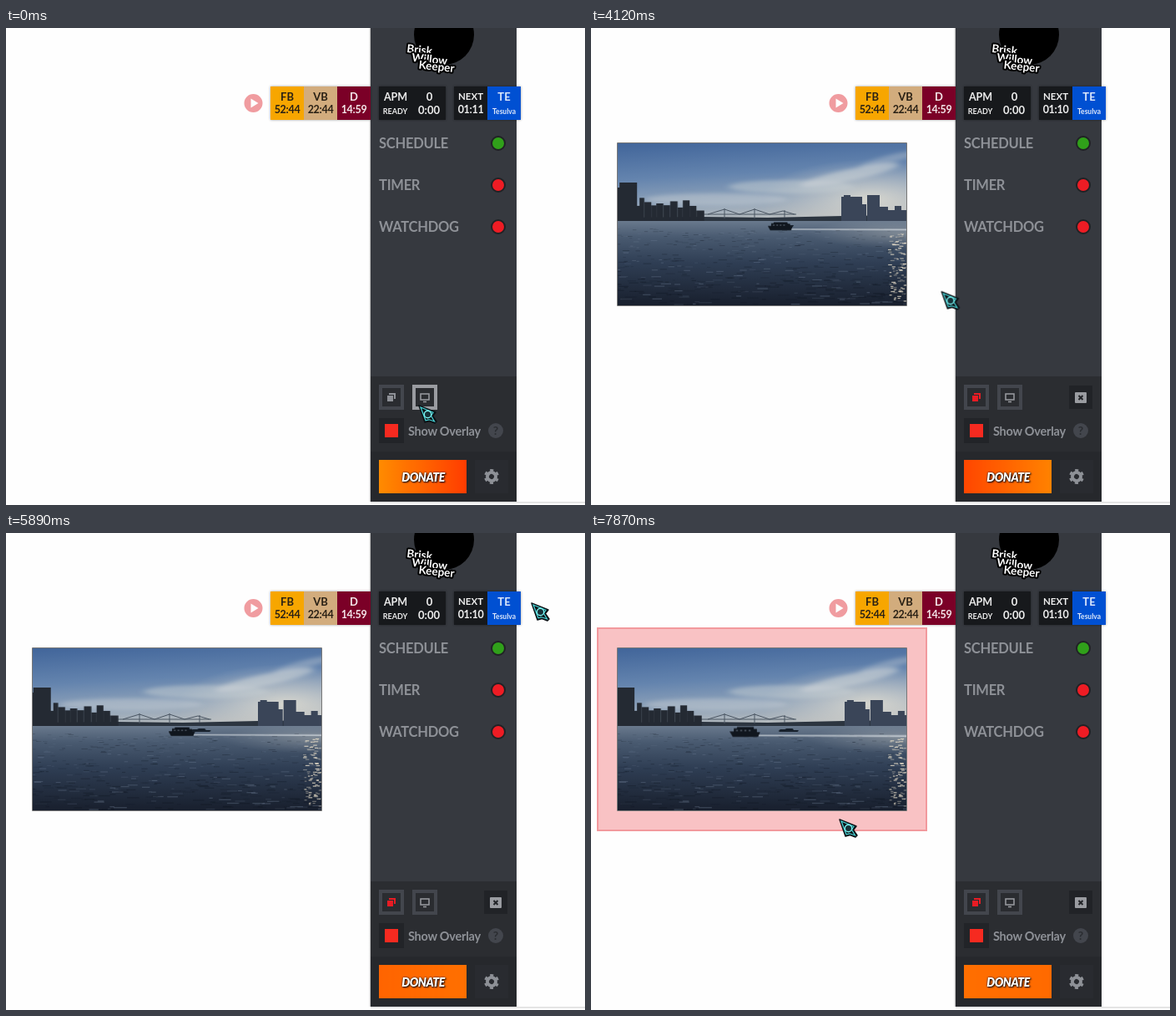
These frames come from a looping animation (694x571 px, 8 s). An HTML page:

```html
<!DOCTYPE html>
<html lang="en">
<head>
<meta charset="utf-8">
<title>Overlay demo</title>
<style>
html, body { margin: 0; width: 100%; height: 100%; overflow: hidden; background: #fefefe; }
svg { display: block; }
text { font-family: Lato, "Open Sans", sans-serif; font-weight: 700; }
.mid { text-anchor: middle; }
.nav { font-size: 16.5px; letter-spacing: -.25px; fill: #8e9197; }
.time { font-size: 12.5px; letter-spacing: -.3px; }
.word { font-size: 13.5px; fill: #fff; stroke: #000; stroke-width: 4px; stroke-linejoin: round; paint-order: stroke; }
.donate { font-size: 14px; font-weight: 900; font-style: italic; letter-spacing: -.5px; fill: #fff; text-shadow: 1px 1px 2px #000, 0 0 2px #000; }
#tiles { filter: drop-shadow(0 0 1.5px rgba(0, 0, 0, .4)); }

.anim, .step { animation-duration: 8s; animation-iteration-count: infinite; }
.anim { animation-timing-function: linear; }
.step { animation-timing-function: step-end; }

#cursor { animation-name: cursor; }
@keyframes cursor {
  0%, 1.9% { transform: translate(495px, 452px); }
  6.25% { transform: translate(636px, 330px); }
  10% { transform: translate(620px, 420px); }
  13.5% { transform: translate(500px, 440px); }
  15% { transform: translate(480px, 446px); }
  19%, 23% { transform: translate(456px, 442px); }
  27.4%, 31.2% { transform: translate(545px, 573px); }
  37%, 39.5% { transform: translate(488px, 501px); }
  43.2% { transform: translate(480px, 436px); }
  50% { transform: translate(465px, 338px); }
  56.4%, 58.5% { transform: translate(276px, 244px); }
  62% { transform: translate(390px, 260px); }
  66% { transform: translate(560px, 140px); }
  69% { transform: translate(660px, 100px); }
  71.7%, 75.5% { transform: translate(630px, 84px); }
  82%, 87.5% { transform: translate(682px, 94px); }
  96.8%, 100% { transform: translate(298px, 343px); }
}
#screenHover { animation-name: screenHover; }
@keyframes screenHover { 0% { opacity: 1 } 2.4% { opacity: 0 } 13% { opacity: 1 } 14.9% { opacity: 0 } }
#layerHover { animation-name: layerHover; }
@keyframes layerHover { 0% { opacity: 0 } 16% { opacity: 1 } 24% { opacity: 0 } }
#before { animation-name: before; }
@keyframes before { 0% { opacity: 1 } 7.5% { opacity: 0 } }
#after { animation-name: after; }
@keyframes after { 0% { opacity: 0 } 7.5% { opacity: 1 } }
#video { animation-name: video; }
@keyframes video { 0% { opacity: 0 } 32.9% { opacity: 1 } }
.captured { animation-name: captured; }
@keyframes captured { 0% { opacity: 0 } 42% { opacity: 1 } }
#player { animation-name: player; }
@keyframes player { 0%, 41% { opacity: 1 } 44%, 100% { opacity: 0 } }
#barHover { animation-name: barHover; }
@keyframes barHover { 0% { opacity: 0 } 75.8% { opacity: 1 } 89% { opacity: 0 } }
#videoHover { animation-name: videoHover; }
@keyframes videoHover { 0% { opacity: 0 } 61.2% { opacity: 1 } 64% { opacity: 0 } 95.4% { opacity: 1 } }
#boat { animation-name: boat; }
@keyframes boat {
  0%, 32% { transform: translate(232px, 238px); }
  38% { transform: translate(231px, 238px); }
  57.9% { transform: translate(224px, 238px) scale(1.05); }
  73.6% { transform: translate(210px, 238.5px) scale(1.1); }
  86.4% { transform: translate(197px, 238.5px) scale(1.18); }
  100% { transform: translate(182px, 239px) scale(1.27); }
}
#ferry { animation-name: ferry; }
@keyframes ferry { 0%, 55% { transform: translateX(-6px) } 100% { transform: none } }
#leftBank { animation-name: leftBank; }
@keyframes leftBank { 0%, 38% { transform: translateX(3px) } 100% { transform: translateX(-1px) } }
#rightBank { animation-name: rightBank; }
@keyframes rightBank { 0%, 55% { transform: none } 100% { transform: translateX(4px) } }
.ripple { animation: ripple .52s step-end infinite; }
.ripple.odd { animation-delay: -.26s; }
@keyframes ripple { 0% { opacity: 1 } 50% { opacity: .5 } }
#warm { animation-name: warm; }
@keyframes warm { 0% { opacity: 1 } 14%, 100% { opacity: .05 } }
#cool { animation-name: cool; }
@keyframes cool { 0%, 42% { opacity: 0 } 55%, 60% { opacity: 1 } 71% { opacity: .25 } 80%, 100% { opacity: 0 } }
</style>
</head>
<body>
<svg width="694" height="571" viewBox="0 0 694 571">
<defs>
  <linearGradient id="edge"><stop stop-color="#000" stop-opacity="0"/><stop offset="1" stop-color="#000" stop-opacity=".28"/></linearGradient>
  <linearGradient id="warmFill"><stop stop-color="#ff8c00"/><stop offset="1" stop-color="#ff3c00"/></linearGradient>
  <linearGradient id="coolFill"><stop stop-color="#ff3800"/><stop offset="1" stop-color="#ff8c00"/></linearGradient>
  <linearGradient id="sky" x2=".2" y2="1"><stop stop-color="#41659a"/><stop offset=".45" stop-color="#6484ae"/><stop offset=".8" stop-color="#94a6ba"/><stop offset="1" stop-color="#b3b9bd"/></linearGradient>
  <radialGradient id="glow"><stop stop-color="#dcdad0" stop-opacity=".9"/><stop offset="1" stop-color="#c8cacb" stop-opacity="0"/></radialGradient>
  <linearGradient id="water" x2="0" y2="1"><stop stop-color="#6b7b8f"/><stop offset=".2" stop-color="#495a70"/><stop offset=".5" stop-color="#2f3e54"/><stop offset="1" stop-color="#181f2d"/></linearGradient>
  <linearGradient id="shade" x2="0" y2="1"><stop stop-opacity=".6"/><stop offset=".1" stop-opacity=".2"/><stop offset=".3" stop-opacity="0"/><stop offset=".85" stop-opacity="0"/><stop offset="1" stop-opacity=".55"/></linearGradient>
  <filter id="soft"><feGaussianBlur stdDeviation="4 2"/></filter>
  <clipPath id="frame"><rect x="32" y="138" width="346" height="194"/></clipPath>
</defs>

<!-- side panel -->
<rect x="435" width="2" height="567" fill="url(#edge)"/>
<rect x="437" y="567" width="257" height="2" fill="#e4e4e4"/>
<rect x="437" width="175" height="567" fill="#36393f"/>
<rect x="437" y="417" width="175" height="150" fill="#2b2d31"/>
<rect x="437" y="507" width="175" height="60" fill="#26282c"/>
<circle cx="525" cy="8" r="36"/>
<g transform="rotate(6 480 30)">
  <text class="word" x="480" y="29">Brisk</text>
  <text class="word" x="487" y="39">Willow</text>
  <text class="word" x="496" y="47">Keeper</text>
</g>
<g id="nav"></g>

<!-- lower controls -->
<g fill="#2a2c30" stroke="#43464d" stroke-width="4">
  <rect x="449" y="429" width="26" height="26"/><rect x="489" y="429" width="26" height="26"/>
</g>
<g fill="none" stroke="#9a9ca1" stroke-width="4">
  <rect id="layerHover" class="step" x="449" y="429" width="26" height="26"/>
  <rect id="screenHover" class="step" x="489" y="429" width="26" height="26"/>
</g>
<g fill="#8e9197">
  <path d="M459 437h8v7h-2v-5h-6z"/><path d="M457 440h7v7h-7z"/>
</g>
<g class="step captured">
  <path fill="#e81c24" d="M459 437h8v7h-2v-5h-6zM457 440h7v7h-7z"/>
  <rect x="573" y="428" width="28" height="28" fill="#212327"/>
  <rect x="580" y="436" width="14" height="13" rx="1" fill="#9a9ca1"/>
  <path d="M584.500 440l5 5m0-5l-5 5" stroke="#212327" stroke-width="2"/>
</g>
<path d="M497 438h10v7h-10zM500 447.500h4" fill="none" stroke="#9a9ca1" stroke-width="1.500"/>
<rect x="447" y="467" width="30" height="30" fill="#222428"/>
<rect x="454" y="474" width="16" height="16" fill="#f62a20"/>
<text x="482" y="488" font-size="14.500" letter-spacing="-.25" fill="#8e9197">Show Overlay</text>
<circle cx="587" cy="482" r="9" fill="#43464d"/>
<text class="mid" x="587" y="487" font-size="14" fill="#2b2d31">?</text>
<rect x="447" y="517" width="105" height="40" fill="#ff6d00"/>
<rect id="warm" class="anim" x="447" y="517" width="105" height="40" fill="url(#warmFill)"/>
<rect id="cool" class="anim" x="447" y="517" width="105" height="40" fill="url(#coolFill)"/>
<text class="mid donate" x="500" y="542.500">DONATE</text>
<rect x="562" y="517" width="40" height="40" fill="#292b30"/>
<g transform="translate(582 537) rotate(30)" fill="none" stroke="#8e9197">
  <circle r="5" stroke-width="4"/><circle r="7.700" stroke-width="2.500" stroke-dasharray="4.030 4.030" stroke-dashoffset="2"/>
</g>

<!-- captured video -->
<g id="videoHover" class="step"><rect x="8" y="114" width="394" height="242" fill="#f9c2c4" stroke="#f2999d" stroke-width="2"/></g>
<g id="video" class="step">
  <rect x="31" y="137" width="348" height="196" rx="1" fill="#777"/>
  <g clip-path="url(#frame)">
    <rect x="32" y="138" width="346" height="94" fill="url(#sky)"/>
    <ellipse cx="335" cy="205" rx="130" ry="48" fill="url(#glow)"/>
    <g filter="url(#soft)" fill="#ccd2d6">
      <ellipse cx="310" cy="176" rx="60" ry="7" opacity=".6" transform="rotate(-12 310 176)"/>
      <ellipse cx="240" cy="190" rx="75" ry="8" opacity=".45"/>
      <ellipse cx="150" cy="205" rx="85" ry="7" opacity=".4"/>
      <ellipse cx="355" cy="158" rx="35" ry="5" opacity=".35" transform="rotate(-15 355 158)"/>
    </g>
    <rect x="32" y="230" width="346" height="102" fill="url(#water)"/>
    <ellipse cx="370" cy="246" rx="110" ry="18" fill="url(#glow)" opacity=".35"/>
    <path d="M32 227l100-1 80 1 90-2 76-1v7H32z" fill="#2c3540"/>
    <path d="M128 223h118M140 223l20-6 18 6 18-6 18 6 16-4 14 4M160 216v12M196 216v12M232 218v9" fill="none" stroke="#4b5663"/>
    <g id="leftBank" class="anim" fill="#242a33"></g>
    <g id="rightBank" class="anim" fill="#3a4558">
      <path d="M300 231v-29h3v-2h8v2h14v29zM325 231v-20h5v20zM331 231v-31h15v31zM346 231v-17h10v4h8v-5h8v5h12v13z"/>
    </g>
    <g id="ripples"></g>
    <g id="ferry" class="anim"><path d="M225 237l2-2h6l1-1h8l1 2h6l-1 2h-22z" fill="#17202b"/></g>
    <g id="boat" class="anim">
      <path d="M12 2L190 2.500v2L14 3.500z" fill="#d5dbe0" opacity=".7"/>
      <path d="M-14-1h4v-3h3v-1.500h16v2h3v3h3L13 4H-11z" fill="#10161e"/>
      <path d="M-8-2h16" stroke="#5a6470" stroke-dasharray="2 2"/>
    </g>
    <g id="player" class="anim">
      <rect x="32" y="138" width="346" height="194" fill="url(#shade)"/>
      <path d="M36 324.500h338" stroke="#b5b9bd"/>
      <path d="M38 328.500h42M348 328.500h26M36 142.500h28" stroke="#d0d3d6" stroke-width="1.500" stroke-dasharray="1 5 2 3"/>
    </g>
  </g>
</g>

<!-- overlay bar -->
<g id="barHover" class="step">
  <rect x="252" y="45" width="442" height="90" fill="#ed1c24" opacity=".27"/>
  <rect x="646" y="83" width="14" height="14" rx="1" fill="#73808a"/>
  <path d="M649 94l7-7m-5 0h5v5" fill="none" stroke="#fbd0d2" stroke-width="1.600"/>
  <rect x="678" y="89" width="14" height="9" rx="1"/>
  <path d="M681 90v-3a4 4 0 0 1 8 0v3" fill="none" stroke="#000" stroke-width="2"/>
</g>
<path d="M285.500 90a11 11 0 0 1 22 0a11 11 0 0 1 -22 0zM293.500 84.500v11l9-5.500z" fill="#e0252f" fill-rule="evenodd" opacity=".45"/>
<g id="tiles"></g>
<g class="mid" fill="#eee">
  <text id="before" class="step time" x="557" y="102">01:11</text>
  <text id="after" class="step time" x="557" y="102">01:10</text>
</g>

<g id="cursor" class="anim">
  <path d="M0 0L20 8l-3.500 4.500L21 19l-2 2-6.500-2.500L7 20z" fill="#0c1216" stroke="#0c1216" stroke-width="1.500" stroke-linejoin="round"/>
  <path d="M2 2l15 6.300-2.500 4 4 6.700-6.500-2.200-4 1z" fill="none" stroke="#48d6d8" stroke-width="1.200"/>
  <circle cx="10.500" cy="10.500" r="4.200" fill="#173238" stroke="#7af0ee" stroke-width="1.400"/>
</g>
</svg>
<script>
const NS = "http://www.w3.org/2000/svg";
const byId = id => document.getElementById(id);

function add(parent, tag, attrs, text) {
  const el = document.createElementNS(NS, tag);
  for (const key in attrs) el.setAttribute(key, attrs[key]);
  if (text) el.textContent = text;
  parent.append(el);
  return el;
}

let seed = 7;
function rand(min, max) {
  seed = (seed * 16807) % 2147483647;
  return min + (max - min) * seed / 2147483647;
}

const nav = byId("nav");
[["SCHEDULE", "#30a01a"], ["TIMER", "#ee1c24"], ["WATCHDOG", "#ee1c24"]].forEach(([label, fill], i) => {
  const y = 138 + i * 50;
  add(nav, "text", { class: "nav", x: 447, y: y + 6 }, label);
  add(nav, "circle", { cx: 590, cy: y, r: 8, fill, stroke: "#202225", "stroke-width": 2 });
});

const tiles = byId("tiles");
const label = (x, y, size, fill, text) =>
  add(tiles, "text", { class: "mid", x, y, "font-size": size, fill }, text);
function tile(x, w, fill) {
  add(tiles, "rect", { x, y: 70, width: w, height: 40, fill });
}
[["FB", "52:44", "#f7a600", "#2a2115"], ["VB", "22:44", "#d2ac7d", "#2a2115"], ["D", "14:59", "#7b0027", "#f3e6e9"]]
  .forEach(([name, time, fill, ink], i) => {
    const x = 317 + i * 40;
    tile(x, 40, fill);
    label(x + 20, 87, 13, ink, name);
    label(x + 20, 102, 12.5, ink, time).classList.add("time");
  });
tile(447, 80, "#17191c");
tile(537, 40, "#17191c");
tile(577, 40, "#0050d2");
label(467, 87, 12.5, "#eee", "APM");
label(507.5, 87, 13, "#eee", "0");
label(466.5, 103, 9, "#eee", "READY");
label(507, 103, 13, "#eee", "0:00");
label(557, 86, 11.5, "#eee", "NEXT");
label(597, 87, 13, "#dfe9fb", "TE");
label(597, 103, 8.5, "#dfe9fb", "Tesulva");

// skyline thins out with distance
const bank = byId("leftBank");
add(bank, "path", { d: "M28 231v-40h4v-6h21v46z" });
for (let x = 52; x < 126;) {
  const w = rand(4, 10), top = rand(200, 214) + (x - 52) * .1;
  add(bank, "rect", { x, y: top, width: w, height: 231 - top });
  x += w;
}

const ripples = [0, 1].map(i => add(byId("ripples"), "g", { class: i ? "ripple odd" : "ripple" }));
for (let i = 0; i < 500; i++) {
  const y = rand(240, 331), near = (y - 235) / 95;
  add(ripples[i % 2], "rect", {
    x: rand(28, 376), y, width: rand(3, 6 + 10 * near), height: .6 + near * .8,
    fill: i % 3 ? "#0e1520" : "#7f90a6", opacity: .3
  });
}
for (let i = 0; i < 90; i++) {
  const y = rand(244, 328);
  add(ripples[i % 2], "rect", {
    x: 367 + rand(-11, 8), y, width: rand(2, 5), height: 1.2, fill: "#f1e6cf", opacity: .75
  });
}
</script>
</body>
</html>
```
